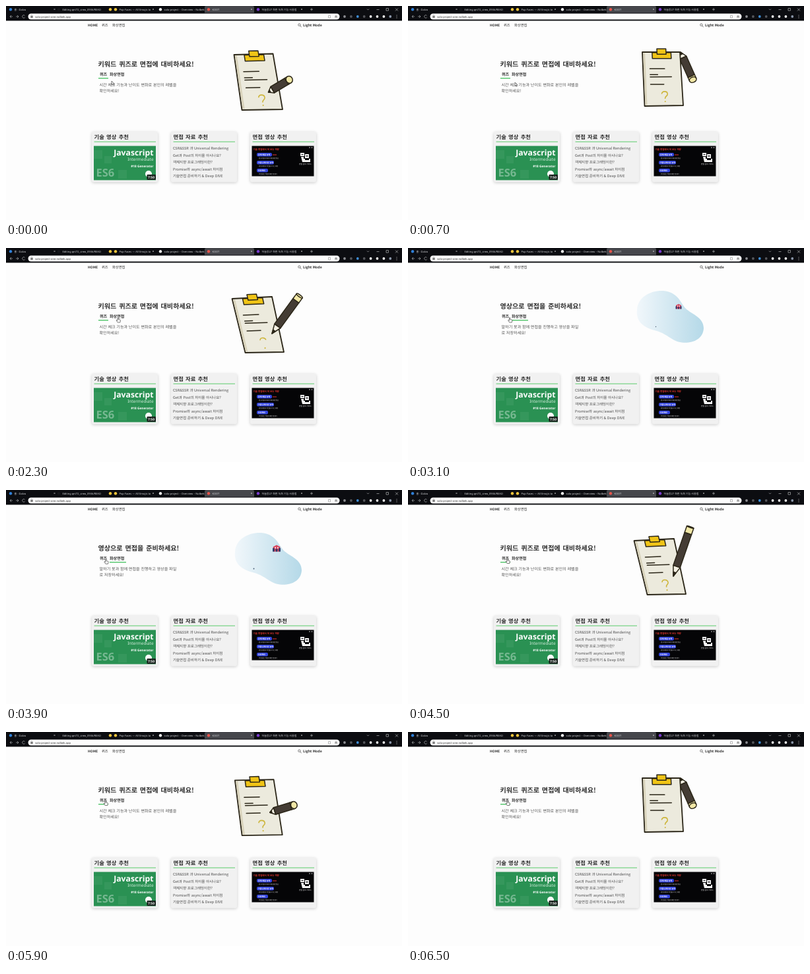
An HTML page for the animation above (6.6 s loop, 600x325 px).

```html
<!DOCTYPE html>
<html lang="ko">
<head>
<meta charset="utf-8">
<title>KOOT</title>
<style>
html, body { margin: 0; width: 100%; height: 100%; overflow: hidden; background: #fdfdfd; }
svg { display: block; width: 600px; height: 325px; }
text { font-family: "Noto Sans CJK KR", "Noto Sans CJK", "Noto Sans", sans-serif; fill: #2c2c2c; white-space: pre; text-rendering: geometricPrecision; }
.b { font-weight: 700; }
.chrome text { font: 4px "Noto Sans", "Noto Sans CJK KR", sans-serif; fill: #d4d5d8; }
.chrome .url { font-size: 4.1px; fill: #333; }
.card rect { filter: drop-shadow(0 1.5px 2px #0003); }
.wide { word-spacing: 1px; }
.items text { font-size: 5.5px; fill: #4a4a4a; }
.para { font-size: 6.1px; fill: #555; }
.latin text { font-family: "Noto Sans", sans-serif; }
.w { fill: #fff; }
</style>
</head>
<body>
<svg viewBox="0 0 600 325">
  <rect width="600" height="325" fill="#fdfdfd"/>

  <g class="chrome">
    <rect width="600" height="22.400" fill="#0c0d11"/>
    <path d="M301 10.500V2q0-2 2-2h71q2 0 2 2v8.500z" fill="#46474c"/>
    <rect x="33.500" y="11.500" width="472" height="9" rx="4.500" fill="#fcfcfc"/>
    <g id="tabs"></g>
    <text x="44" y="17.600" class="url">solo-project-one.nolbek.app</text>
    <path d="M10 16H6m2-2-2 2 2 2M15 16h4m-2-2 2 2-2 2M28.500 14.500a2.200 2.200 0 1 0 .3 2.500M461 5.200h4m-2-2v4M547 4.500l1.500 1.500L550 4.500M561.500 5.500h4M576 3.500h3.500V7H576zM590 3.500l4 4m0-4-4 4" fill="none" stroke="#c8c9cc" stroke-width=".6"/>
    <path d="M38 15.500v-1a1 1 0 0 1 2 0v1M488.500 14.500h3v3.500h-3zM500 14l1.700 4-3.600-2.500h4l-3.600 2.500z" fill="none" stroke="#777" stroke-width=".5"/>
    <rect x="37.300" y="15.300" width="3.400" height="2.500" fill="#666"/>
    <g id="icons"></g>
  </g>

  <g font-size="5.300">
    <text x="124" y="31" class="b" font-size="5">HOME</text>
    <text x="145" y="31" font-weight="500">퀴즈</text>
    <text x="161" y="31" font-weight="500">화상면접</text>
    <text x="450" y="31" class="b" font-size="5.200">Light Mode</text>
    <path d="M445.700 30l1.800 1.800" stroke="#222" stroke-width=".8"/>
    <circle cx="444.400" cy="28.600" r="1.700" fill="none" stroke="#222" stroke-width=".6"/>
  </g>

  <text id="title" x="139.500" y="92" class="b wide" font-size="10.100"></text>
  <g class="b" font-size="6.100"><text x="142" y="106">퀴즈</text><text x="157" y="106">화상면접</text></g>
  <rect id="underline" y="109" height="1.400" fill="#4fc468"/>
  <text id="line1" x="141.500" y="122" class="para"></text>
  <text id="line2" x="141.500" y="130.700" class="para"></text>

  <g id="cards" class="card"></g>

  <defs>
    <linearGradient id="sky"><stop stop-color="#f1f7fb"/><stop offset="1" stop-color="#b5d9e8"/></linearGradient>
  </defs>
  <g class="latin">
    <rect x="133" y="212.500" width="94" height="52" fill="#2a9153"/>
    <path d="M133 219h13v13h-13zM149 228h11v11h-11zM170 249h13v13h-13z" fill="#fff" fill-opacity=".05"/>
    <text x="136.500" y="259" font-size="16.500" font-weight="600" fill-opacity=".36" class="w">ES6</text>
    <g text-anchor="end">
      <text x="223.500" y="227" font-size="12.200" class="b w">Javascript</text>
      <text x="223.500" y="235" font-size="6.400" style="fill:#d3eddc">Intermediate</text>
      <text x="223.500" y="245" font-size="4.800" class="b w">#18 Generator</text>
    </g>
    <circle cx="216" cy="255" r="5" fill="#fff"/>
    <rect x="213.500" y="256" width="13.500" height="8" rx="1" fill="#16211b"/>
    <text x="215" y="261.800" font-size="5" class="b w">7:50</text>
  </g>
  <g class="items">
    <text x="253" y="218.300">CSR&amp;SSR 과 Universal Rendering</text>
    <text x="253" y="228.800">Get과 Post의 차이를 아시나요?</text>
    <text x="253" y="239.300">객체지향 프로그래밍이란?</text>
    <text x="253" y="249.800">Promise와 async/await 차이점</text>
    <text x="253" y="260.300">기술면접 준비하기 &amp; Deep DIVE</text>
  </g>
  <g>
    <rect x="372.500" y="212.500" width="94" height="46" fill="#050507"/>
    <text x="374.500" y="218.500" font-size="3.500" class="b" style="fill:#e5352e">기술 면접에서 꼭 보는 역량</text>
    <g id="pills"></g>
    <path d="M446 223h6v5h-6zM453 225h6v6h-6zM447 229h4v3h2v2h6v-2h2v5h-12z" fill="#f5f5f5"/>
    <path d="M447.500 225h3v1h-3zM454.500 227h3v1.500h-3z" fill="#16161a"/>
    <text x="444" y="241" font-size="2.700" class="w">면접 준비 가이드</text>
    <circle cx="460" cy="215" r=".8" fill="#ddd"/><circle cx="463.500" cy="215" r=".8" fill="#ddd"/>
  </g>

  <g id="art"></g>
  <g id="cursor" stroke="#222" stroke-width=".6" stroke-linejoin="round" fill="#fff"><path/></g>
</svg>

<script>
const $ = id => document.getElementById(id);
const INK = '#2b2618', CREAM = '#f1e7a6';

// Static repeats
$('tabs').innerHTML = [
  [7, '홈 - Dalvo', 72.5, '#2f80d8'],
  [80, 'Editing qnt72_crew_0936/READ', 0, '#15161a'],
  [158, '', 0, '#f3c63c'],
  [166, 'Pop Faces — All Emojis to', 222, '#f3c63c'],
  [234, 'solo-project – Overview – Nolbek', 0, '#f4f4f4'],
  [307, 'KOOT', 371, '#e5544b'],
  [382, '하늘창27 화면 녹화 기능 사용법', 447, '#7a3bd0']
].map(([x, label, close, color]) =>
  `<circle cx="${x}" cy="5.200" r="2.200" fill="${color}"/>
   <text x="${x + 5.500}" y="6.800">${label}</text>` + (close &&
  `<path d="M${close} 4l2 2m0-2-2 2" stroke="#ddd" stroke-width=".5"/>`)).join('');

$('icons').innerHTML = ['#8d8e93', '#55575c', '#3f8fd8', '#55575c', '#f0f0f0', '#f0f0f0', '#f0f0f0', '#8a96a8']
  .map((c, i) => `<circle cx="${513 + i * 9.900}" cy="16" r="1.900" fill="${c}"/>`).join('') +
  [14, 16, 18].map(y => `<circle cx="592" cy="${y}" r=".5" fill="#ddd"/>`).join('');

$('cards').innerHTML = ['기술 영상 추천', '면접 자료 추천', '면접 영상 추천'].map((label, i) => {
  const x = 130 + i * 120;
  return `<rect x="${x}" y="191" width="100" height="76.500" rx="3" fill="#f1f1f1"/>
    <text x="${x + 3.500}" y="202.200" class="b wide" font-size="8.300">${label}</text>
    <path d="M${x + 3.500} 206.200h93.500" stroke="#5ccb6c"/>`;
}).join('');

$('pills').innerHTML = [
  ['문제 해결 능력', 23, '- 알고리즘과 자료구조를 통한 접근'],
  ['커뮤니케이션 능력', 26, '- 협업 경험과 의견을 나누는 방법'],
  ['프로젝트', 17, '- 직접 맡은 역할과 배운 점 정리']
].map(([label, w, note], i) => {
  const y = 223 + i * 12;
  return `<rect x="380" y="${y}" width="${w}" height="5.500" rx="2" fill="#3344dd"/>
    <text x="382" y="${y + 4}" font-size="3" class="b w">${label}</text>
    <text x="382" y="${y + 9}" font-size="2.200" class="w">${note}</text>`;
}).join('') + '<path d="M404 226h6" stroke="#d33" stroke-width="1"/>';

// Keys are [time, ...values]; values between keys are linear
function track(keys, t) {
  const i = keys.findIndex(k => k[0] > t);
  if (i < 0) return keys[keys.length - 1].slice(1);
  const a = keys[i - 1], b = keys[i], f = (t - a[0]) / (b[0] - a[0]);
  return a.slice(1).map((v, j) => v + (b[j + 1] - v) * f);
}

// Board corners: top left, top right, bottom right, bottom left
const REST = [355, 70, 412, 70, 417, 151, 358.5, 152];
const WRITE = [342.5, 77, 403, 74, 421, 158, 362.5, 159];
const BOARD = [[0, ...REST], [200, ...WRITE], [1300, ...WRITE],
  [1700, 345.5, 74, 404.5, 72.5, 419, 157, 357.5, 158], [2400, ...REST], [2700, ...REST]];
// Pen: tip x, tip y, angle, length
const PEN = [[0, 413, 70, 66, 46], [100, 404, 105, 0, 44], [200, 402, 131, -66, 76],
  [400, 402, 131, -71, 79], [600, 403, 131, -70, 79], [1100, 403, 131, -61, 79],
  [1300, 403, 130, -54, 71], [1700, 397.5, 131, -31, 37], [2400, 413, 70, 66, 46], [2700, 413, 70, 66, 46]];
const INKED = [[0, 100], [500, 100], [700, 25], [1100, 50], [1300, 58], [1700, 100], [2700, 100]];

function penArt(p) {
  const [x, y, a, len] = track(PEN, p);
  const tip = len * .2, band = len * .87, cap = (86 - len) / 10;
  return `<g transform="translate(${x} ${y}) rotate(${a})" stroke="${INK}" stroke-width="1.500" stroke-linejoin="round">
    <path d="M0 0L${tip}-5.500V5.500z" fill="#f4f0e2"/><path d="M0 0L${tip * .4}-2V2z" fill="${INK}"/>
    <path d="M${tip}-5.500H${band}V5.500H${tip}z" fill="#443c34"/>
    <path d="M${band}-5.500H${len}V5.500H${band}z" fill="${CREAM}"/>
    <ellipse cx="${len}" rx="${cap}" ry="5.500" fill="${CREAM}"/></g>`;
}

function clipboard(p) {
  const q = track(BOARD, p);
  const at = (u, v) => [0, 1].map(k =>
    ((q[k] * (1 - u) + q[2 + k] * u) * (1 - v) + (q[6 + k] * (1 - u) + q[4 + k] * u) * v).toFixed(2)).join(' ');
  const poly = (...uv) => 'M' + uv.map(c => at(...c)).join('L');
  const box = (u, v, u2, v2) => poly([u, v], [u2, v], [u2, v2], [u, v2]) + 'z';
  const rows = [[.31, .57], [.42, .38], [.46, .74], [.6, .53]]
    .map(([v, end]) => poly([.18, v], [end, v])).join('');
  const board = `<g stroke="${INK}" stroke-width="1.800" stroke-linejoin="round" stroke-linecap="round" fill="none">
    <path d="${box(0, 0, 1, 1)}" fill="#eceadd"/>
    <path d="${box(.02, .02, .07, .98)}" fill="#d8d2ba" stroke="none"/>
    <path d="${rows}" stroke-width="1.500"/>
    <path d="${box(.26, .01, .76, .12)}" fill="#f0c416" stroke-width="1.500"/>
    <path d="${box(.39, -.06, .63, .04)}" fill="#f0c416" stroke-width="1.500"/>
    <path d="M${at(.46, .78)}C${at(.46, .72)} ${at(.61, .72)} ${at(.61, .78)}C${at(.61, .83)} ${at(.54, .81)} ${at(.54, .87)}"
      pathLength="100" stroke-dasharray="${track(INKED, p)[0]} 200" stroke="#cdb53a" stroke-width="1.600" stroke-linecap="butt"/>
    <path d="${poly([.54, .92], [.54, .922])}" stroke="#cdb53a" stroke-width="2"/></g>`;
  return p < 100 || p > 2100 ? penArt(p) + board : board + penArt(p);
}

function blob(p) {
  const s = Math.min(1, p / 400) * (1 + Math.max(0, p - 500) / 2500);
  return `<path d="M347 94C348 74 368 64 387 65C407 67 412 80 419 90C427 100 448 104 448 122
      C447 139 431 145 415 143.500C400 142 394 131 377 126C357 121 345 112 347 94z" fill="url(#sky)"/>
    <circle cx="375.500" cy="119.500" r="${.7 * s}" fill="#42566e"/>
    <g transform="translate(410 89.500) scale(${s})">
      <path d="M-4-2.500L0-4.500 4-2.500V3H-4z" fill="#d6455c"/>
      <path d="M-4.500-1h2v4h-2zM2.500-1h2v4h-2zM-1 0h2v3h-2z" fill="#293a6b"/>
      <path d="M-2-2h1.200v1.500H-2zM.8-2H2v1.500H.8z" fill="#fff"/></g>`;
}

const TEXT = {
  quiz: ['키워드 퀴즈로 면접에 대비하세요!', '시간 체크 기능과 난이도 변화로 본인의 레벨을', '확인하세요!'],
  video: ['영상으로 면접을 준비하세요!', '말하기 봇과 함께 면접을 진행하고 영상을 파일', '로 저장하세요!']
};
const OPEN = 2600, BACK = 4100;
const UNDERLINE = [[0, 140, 15], [OPEN, 140, 15], [OPEN + 300, 157, 25], [BACK, 157, 25], [BACK + 300, 140, 15]];
const CURSOR = [[0, 160, 114], [1400, 164, 118], [2000, 168, 109], [2300, 169, 105.5], [2700, 169, 105.5],
  [3100, 153.5, 105.5], [4100, 150, 104.5], [4500, 150, 104]];
const ARROW = 'M0 0V5.500L1.400 4.300 2.400 6.300 3.300 5.800 2.400 4H4z';
const HAND = 'M0 .5Q.7-.5 1.300.5V3L4 3.600Q4.600 3.900 4.400 5L3.800 7.500H.2L-1.800 4.600Q-1.800 3.700-1 3.900L0 4.700z';

let shown = -1;
function draw(now) {
  const t = Math.floor(now / 100) * 100 % 6600;
  if (t !== shown) {
    shown = t;
    const video = t >= OPEN && t < BACK;
    const words = video ? TEXT.video : TEXT.quiz;
    ['title', 'line1', 'line2'].forEach((id, i) => $(id).textContent = words[i]);
    $('art').innerHTML = video ? blob(t - OPEN) : clipboard(t < OPEN ? (t + 1700) % 2700 : t - BACK);
    const [x, w] = track(UNDERLINE, t);
    $('underline').setAttribute('x', x);
    $('underline').setAttribute('width', w);
    $('cursor').setAttribute('transform', `translate(${track(CURSOR, t).join(' ')})`);
    $('cursor').firstChild.setAttribute('d', t < 2100 ? ARROW : HAND);
  }
  requestAnimationFrame(() => draw(performance.now() - start));
}
const start = performance.now();
draw(0);
</script>
</body>
</html>
```
